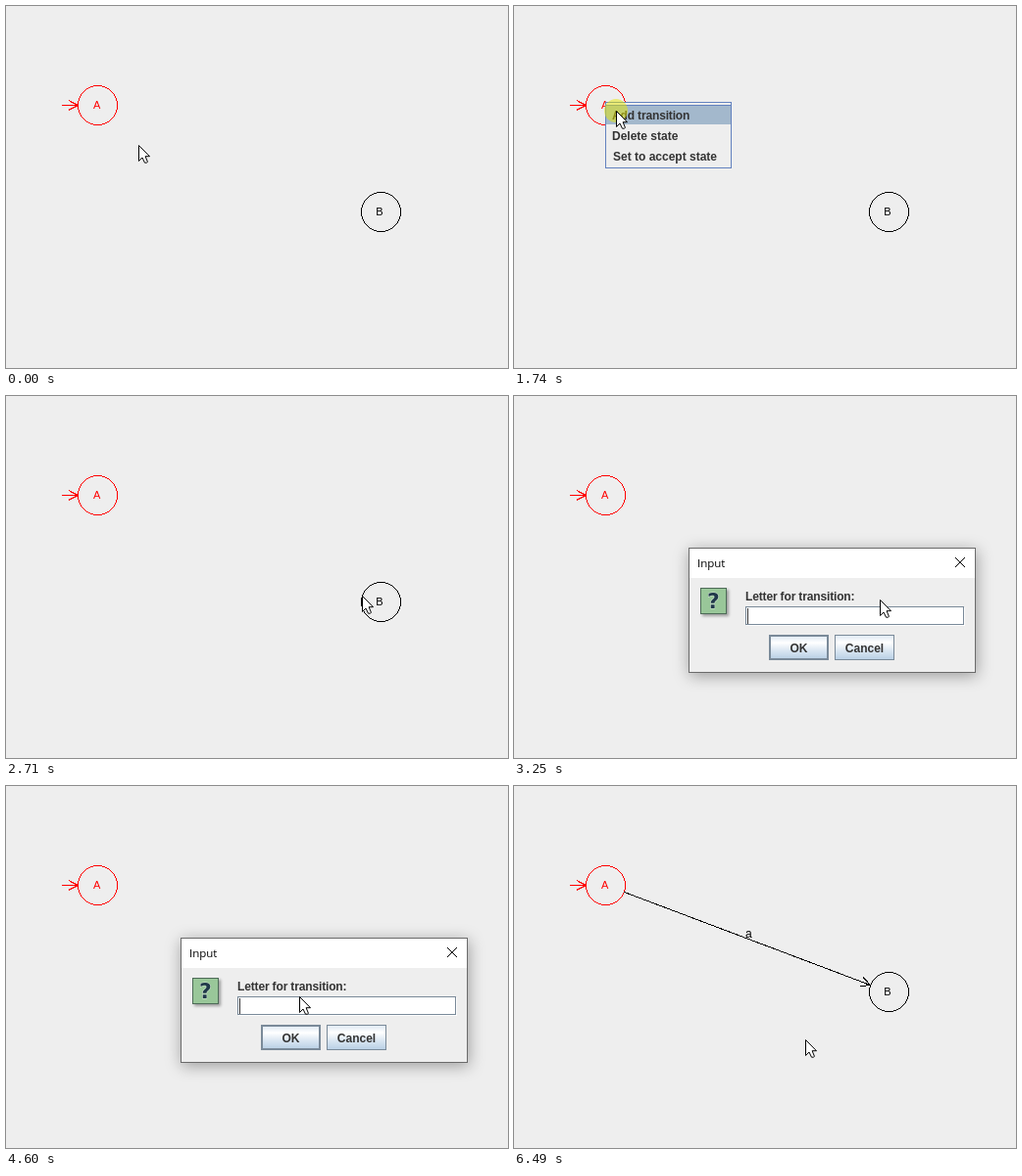
An HTML page for the animation above (6950 ms loop, 512 by 370 pixels).

```html
<!DOCTYPE html>
<html lang="en">
<head>
<meta charset="utf-8">
<title>Adding a transition</title>
<style>
  html, body { margin: 0; width: 100%; height: 100%; overflow: hidden; background: #eee; }
  svg { display: block; }
  text { font: 12px "Liberation Sans", Arial, sans-serif; fill: #333; }
  .bold { font-weight: bold; }
  .tight { letter-spacing: -.15px; }
  .small { font-size: 11px; }
  .title { font: 11.5px "Open Sans", "Noto Sans", sans-serif; fill: #000; }
  .mark { font: bold 22px "DejaVu Sans", sans-serif; fill: #21394a; stroke: #dcebdc; paint-order: stroke; }
  .mid { text-anchor: middle; }
  .line { fill: none; stroke: #000; }
  .red { stroke: #f00; }
  .crisp { shape-rendering: crispEdges; }
  .button { fill: url(#steel); stroke: #7a8a99; }
  #dialog { transform-origin: 324px 219px; }
  #frame { filter: drop-shadow(1px 3px 8px rgba(0, 0, 0, .35)); }
  #icon { filter: drop-shadow(2px 2px 1.5px rgba(0, 0, 0, .35)); }
</style>
</head>
<body>
<svg width="512" height="370" viewBox="0 0 512 370">
  <defs>
    <linearGradient id="steel" x2="0" y2="1">
      <stop offset="0" stop-color="#dde8f3"/>
      <stop offset=".3" stop-color="#fff"/>
      <stop offset=".6" stop-color="#dde8f3"/>
      <stop offset="1" stop-color="#b8cfe5"/>
    </linearGradient>
  </defs>

  <g class="crisp">
    <circle class="line red" cx="93.5" cy="101.5" r="20"/>
    <circle class="line" cx="382.5" cy="210.5" r="20"/>
    <path class="line red" id="start"/>
  </g>
  <text class="small" x="89" y="105" style="fill:#f00">A</text>
  <text class="small" x="377.3" y="214" style="fill:#000">B</text>

  <g id="edge">
    <path class="line crisp" id="edgeLine"/>
    <text x="236" y="155" style="fill:#000">a</text>
  </g>

  <g id="menu">
    <g class="crisp">
      <rect x="93.5" y="98.5" width="128" height="67" fill="#eee" stroke="#6382bf"/>
      <g id="hover">
        <rect x="94" y="101" width="127" height="20" fill="#a3b8cc"/>
        <path d="M94 101.5H221" stroke="#6382bf"/>
      </g>
    </g>
    <text class="bold tight" x="100" y="116">Add transition</text>
    <text class="bold" x="100" y="137">Delete state</text>
    <text class="bold" x="101" y="158">Set to accept state</text>
  </g>

  <g id="dialog">
    <rect id="frame" x="178" y="155" width="293" height="128" fill="#6b6b6b"/>
    <rect x="179" y="156" width="291" height="30" fill="#fff"/>
    <rect x="179" y="186" width="291" height="96" fill="#eee"/>
    <text class="title" x="187" y="175">Input</text>
    <path class="line" d="M450 165l10 10m0-10l-10 10"/>

    <rect id="icon" x="190.5" y="196.5" width="26" height="26" fill="#99c799" stroke="#4d6b57"/>
    <text class="mark mid" x="203.5" y="217">?</text>

    <text class="bold tight" x="236" y="209">Letter for transition:</text>
    <rect x="237" y="216" width="223" height="19" fill="#fff"/>
    <rect x="236.5" y="215.5" width="222" height="18" fill="#fff" stroke="#7a8a99"/>
    <text id="typed" x="238" y="230">a</text>
    <rect id="caret" y="217" width="1" height="16" fill="#333"/>

    <rect class="button" x="261" y="245" width="59" height="24" stroke-width="2"/>
    <text class="bold mid" x="290.5" y="262">OK</text>
    <rect class="button" x="327.5" y="244.5" width="60" height="25"/>
    <text class="bold mid" x="357.5" y="262">Cancel</text>
  </g>

  <g id="pointer">
    <circle id="glow" r="12" fill="#e6e600" fill-opacity=".5"/>
    <path d="M.5 .5V16.5L4 13L6.5 18.2H8.6L9.4 17.2L7.1 11.7H11.5Z" fill="#fff" stroke="#000"/>
  </g>
</svg>

<script>
const LOOP = 6950, TICK = 30, BLINK = 500;

// Places the hand visits: departure, arrival, x, y
const STOPS = [
  [0, 0, 135, 142],
  [20, 510, 101, 95],
  [630, 780, 93, 98],
  [1220, 1460, 104, 107],
  [2070, 2790, 373, 208],
  [3500, 3860, 305, 210],
  [4050, 4230, 299, 215],
  [5020, 5400, 299, 254],
  [5740, 5880, 297, 259]
];
const PRESSES = [860, 1740, 2890, 6340], PRESS = 80;
const MENU = [940, 1820], HOVER = [1300, 1820];
const OPEN = 2970, FOCUS = 3210, TYPED = 5210, CLOSE = 6410, DONE = 6490;

const el = id => document.getElementById(id);
const within = (t, [from, to]) => t >= from && t < to;
const show = (id, on) => { el(id).style.display = on ? "" : "none"; };
const easeOut = p => 1 - (1 - p) ** 1.6;

// A line with two wings at its end
function arrow(x1, y1, x2, y2) {
  const back = Math.atan2(y1 - y2, x1 - x2);
  const wing = turn => {
    const a = back + turn * .47;
    return `M${x2} ${y2}l${11 * Math.cos(a)} ${11 * Math.sin(a)}`;
  };
  return `M${x1} ${y1}L${x2} ${y2}${wing(1)}${wing(-1)}`;
}

function pointerAt(t) {
  let x = 0, y = 0;
  for (const [from, to, tx, ty] of STOPS) {
    if (t < from) break;
    const spent = Math.floor((t - from) / TICK) * TICK;
    const p = t >= to ? 1 : easeOut(spent / (to - from));
    x += (tx - x) * p;
    y += (ty - y) * p;
  }
  return [Math.round(x), Math.round(y)];
}

function draw(t) {
  el("pointer").setAttribute("transform", `translate(${pointerAt(t)})`);
  show("glow", PRESSES.some(at => within(t, [at, at + PRESS])));
  show("menu", within(t, MENU));
  show("hover", within(t, HOVER));
  show("edge", t >= DONE);

  show("dialog", within(t, [OPEN, DONE]));
  const grown = Math.min(1, (Math.floor((t - OPEN) / 50) + 1) / 4);
  el("dialog").style.opacity = t >= CLOSE ? .5 : grown;
  el("dialog").style.transform = grown < 1 ? `scale(${.92 + .08 * grown})` : "none";

  // The caret blinks until the field loses focus
  const lit = Math.floor((t - FOCUS) / BLINK) % 2 === 0;
  show("typed", t >= TYPED);
  show("caret", lit && within(t, [FOCUS, TYPED + BLINK]));
  el("caret").setAttribute("x", t >= TYPED ? 245 : 238);
}

el("start").setAttribute("d", arrow(57, 101.5, 73.5, 101.5));
el("edgeLine").setAttribute("d", arrow(112.5, 108.5, 363.5, 203.5));

const begun = performance.now();
function tick() {
  draw((performance.now() - begun) % LOOP);
  requestAnimationFrame(tick);
}
tick();
</script>
</body>
</html>
```
